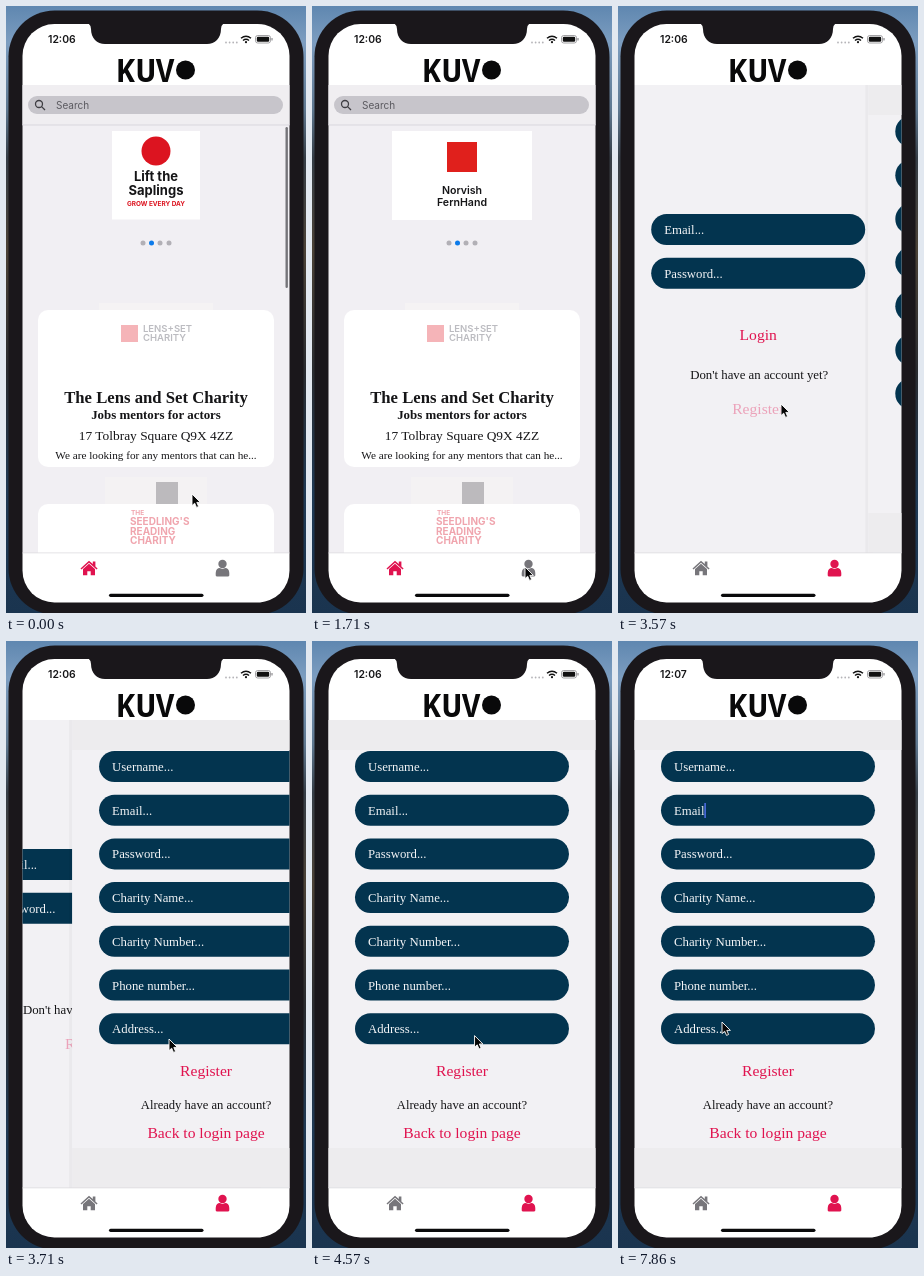
Animation, 300 px wide and 607 px high, one loop 8000 ms. Source, as an HTML page:

```html
<!DOCTYPE html>
<html lang="en">
<head>
<meta charset="utf-8">
<style>
  html, body { margin: 0; width: 100%; height: 100%; overflow: hidden; background: #14283c; }
  svg { display: block; width: 100vw; height: 100vh; }
  .serif { font-family: "Liberation Serif", serif; }
  .sans { font-family: Inter, sans-serif; }
  .mono { font-family: "Noto Sans Mono", monospace; }
</style>
</head>
<body>
<svg id="stage" viewBox="0 0 300 607" xmlns="http://www.w3.org/2000/svg"></svg>
<script>
const LOOP = 8000, PAGE = 267;
const NAVY = '#03344f', PINK = '#e0134f', GREY = '#77767b', PAPER = '#f2f1f4', BODY = '#1a171b';

const rect = (x, y, w, h, fill, r = 0, extra = '') =>
  `<rect x="${x}" y="${y}" width="${w}" height="${h}" rx="${r}" fill="${fill}" ${extra}/>`;
const circle = (x, y, r, fill) => `<circle cx="${x}" cy="${y}" r="${r}" fill="${fill}"/>`;
const text = (s, x, y, size, { cls = 'serif', fill = '#151517', anchor = 'middle', weight = 400, id = '' } = {}) =>
  `<text class="${cls}" ${id && `id="${id}"`} x="${x}" y="${y}" font-size="${size}" fill="${fill}" text-anchor="${anchor}" font-weight="${weight}">${s}</text>`;
const group = (id, body, extra = '') => `<g id="${id}" ${extra}>${body}</g>`;
const field = (label, y, id) => rect(43, y, 214, 31, NAVY, 15.5) +
  text(label, 56, y + 20, 12.75, { fill: '#f4f5f7', anchor: 'start', id });
const link = (label, y, id) => text(label, 150, y, 15.6, { fill: PINK, id });

const background = `
  <defs>
    <linearGradient id="photo" x1="0" y1="0" x2="0" y2="1">
      <stop offset="0" stop-color="#5f87b0"/><stop offset=".06" stop-color="#7c9dc0"/>
      <stop offset=".17" stop-color="#5f7890"/><stop offset=".25" stop-color="#363e47"/>
      <stop offset=".4" stop-color="#4b4237"/><stop offset=".6" stop-color="#2a2c30"/>
      <stop offset=".8" stop-color="#203a55"/><stop offset="1" stop-color="#1a344f"/>
    </linearGradient>
    <clipPath id="screen"><rect x="16.5" y="18" width="267" height="578.500" rx="32"/></clipPath>
    <clipPath id="content"><rect x="16" y="79" width="268" height="468"/></clipPath>
  </defs>
  ${rect(0, 0, 300, 607, 'url(#photo)')}
  ${rect(2.5, 4.5, 295, 604, BODY, 46)}`;

const slideA = rect(106, 125, 88, 88.5, '#fff') + circle(150, 145, 14.5, '#dc1420') +
  text('Lift the', 150, 175, 13, { cls: 'sans', weight: 700 }) +
  text('Saplings', 150, 189, 13, { cls: 'sans', weight: 700 }) +
  text('GROW EVERY DAY', 150, 200, 6.4, { cls: 'sans', weight: 700, fill: '#dc1420' });
const slideB = rect(80, 125, 140, 89, '#fff') + rect(135, 136, 30, 30, '#e0201c') +
  text('Norvish', 150, 188, 10.6, { cls: 'sans', weight: 600 }) +
  text('FernHand', 150, 200, 10.6, { cls: 'sans', weight: 600 });

const faint = { cls: 'sans', fill: '#bcbcc1', anchor: 'start', weight: 600 };
const blush = { cls: 'sans', fill: '#f0a5ae', anchor: 'start', weight: 700 };
const home = rect(16, 79, 268, 468, '#f1eff3') +
  rect(16, 79, 268, 40, '#f0eef1') + rect(16, 118.5, 268, 1, '#dad8dd') +
  rect(22, 90, 255, 18, '#c7c5cb', 9) +
  `<g fill="none" stroke="#3f3e43" stroke-width="1.3"><circle cx="33" cy="98" r="3.5"/><path d="M35.6 100.6L39 104"/></g>` +
  text('Search', 50, 103, 10, { cls: 'sans', fill: '#5b5a60', anchor: 'start' }) +
  group('slides', slideA + `<g transform="translate(${PAGE})">${slideB}</g>`) +
  [137, 145.5, 154, 163].map((x, i) => circle(x, 237, 2.5, i === 1 ? '#0d7bea' : '#b2b0b6')).join('') +
  rect(93, 297, 114, 8, '#f5f3f4') +
  rect(32, 304, 236, 157, '#fff', 10) +
  rect(115, 319, 17, 17, '#f5b4b8') +
  text('LENS+SET', 137, 326, 9.5, faint) + text('CHARITY', 137, 335, 9.5, faint) +
  text('The Lens and Set Charity', 150, 397, 16.7, { weight: 700 }) +
  text('Jobs mentors for actors', 150, 413, 12.9, { weight: 700 }) +
  text('17 Tolbray Square Q9X 4ZZ', 150, 434, 13.4) +
  text('We are looking for any mentors that can he...', 150, 453, 11.2) +
  rect(99, 471, 102, 29, '#f4f2f3') +
  rect(32, 498, 236, 80, '#fff', 10) +
  rect(150, 476, 22, 22, '#bcbabd') +
  text('THE', 125, 509, 6.5, blush) +
  ["SEEDLING'S", 'READING', 'CHARITY'].map((s, i) => text(s, 124, 519 + i * 9.5, 10, blush)).join('') +
  group('scrollbar', rect(279.5, 121, 2.4, 161, '#757479', 1.2));

const login = rect(16, 79, 268, 468, PAPER) +
  field('Email...', 208) + field('Password...', 251.8) +
  rect(56, 216, 1.3, 15, '#4a68f0', 0, 'id="loginCaret"') +
  link('Login', 334) + text("Don't have an account yet?", 151, 373, 12.8) +
  link('Register', 408, 'registerLink');

const labels = ['Username', 'Email', 'Password', 'Charity Name', 'Charity Number', 'Phone number', 'Address'];
const register = rect(13, 79, 3, 468, '#000', 0, 'opacity=".03"') +
  rect(16, 79, 268, 468, PAPER) +
  rect(16, 79, 268, 30, '#edecee') + rect(16, 507, 268, 40, '#edecee') +
  labels.map((s, i) => field(s + '...', 110 + i * 43.7, 'input' + i)).join('') +
  rect(56, 162, 1.3, 15, '#5b78ff', 0, 'id="emailCaret"') +
  link('Register', 435) + text('Already have an account?', 150, 468, 12.6) +
  link('Back to login page', 497);

const chrome = rect(16, 18, 268, 61, '#fff') +
  text('KUV', 111, 76, 32, { cls: 'mono', anchor: 'start', weight: 700, fill: '#09090a' }) +
  circle(179.5, 64, 9.5, '#09090a') +
  text('', 42, 37, 10.4, { cls: 'sans', anchor: 'start', weight: 600, id: 'clock' }) +
  [220, 223.6, 227.2, 230.8].map(x => circle(x, 36.5, .9, '#b5b4b8')).join('') +
  `<g fill="none" stroke="#111" stroke-width="1.5"><path d="M235 32.3q5-4.2 10 0M237 34.5q3-2.4 6 0"/></g>` +
  circle(240, 36.2, 1.1, '#111') +
  rect(249.5, 29.5, 15, 7.5, 'none', 2.2, 'stroke="#8c8b8f" stroke-width=".8"') +
  rect(250.8, 30.8, 12.4, 4.9, '#111', 1.2) + rect(265.4, 32, 1.2, 2.6, '#8c8b8f', .5) +
  rect(16, 547, 268, 50, '#fff') + rect(16, 546.5, 268, .8, '#dddce0') +
  group('homeTab', `<path d="M74.5 562.5L83 554.700l3.800 3.400V555.500h2.600v5l2.200 2-1 1.100-7.600-6.800-7.500 6.800z"/><path d="M77 563.100l6-5.300 6 5.300v6.200h-4.300v-4h-3.400v4H77z"/>`) +
  group('userTab', `<circle cx="216.500" cy="558" r="4.200"/><path d="M209.700 569.400v-2.500c0-3 2-4.800 4-4.800q2.800 1.600 5.600 0c2 0 4 1.800 4 4.800v2.500q-.3 1-1.300 1h-11q-1 0-1.300-1z"/>`) +
  rect(103, 587.7, 94.5, 3.2, '#0a0a0b', 1.6) +
  `<path d="M79 17q6 0 6 6c0 9 6 15 14 15h102c8 0 14-6 14-15q0-6 6-6z" fill="${BODY}"/>`;

const pointer = group('cursor',
  `<path d="M0 0V11.600L2.700 9.200 4.500 13.400 6.600 12.500 4.800 8.400H8.400z" fill="#050505" stroke="#fff" stroke-width=".9"/>`);

document.getElementById('stage').innerHTML = background +
  `<g clip-path="url(#screen)"><g clip-path="url(#content)">
    ${group('home', home)}${group('login', login)}${group('register', register)}
  </g>${chrome}</g>${pointer}`;

const el = id => document.getElementById(id);
const clamp = v => Math.min(1, Math.max(0, v));
const span = (t, from, to) => clamp((t - from) / (to - from));
const easeInOut = u => u < .5 ? 4 * u ** 3 : 1 - (2 - 2 * u) ** 3 / 2;
const smooth = u => u * u * (3 - 2 * u);
const between = (t, from, to) => t >= from && t < to;
const show = (id, on) => el(id).setAttribute('display', on ? 'inline' : 'none');
const shift = (id, x, y = 0) => el(id).setAttribute('transform', `translate(${x} ${y})`);

// [time, x, y] of the pointer tip
const path = [
  [140, 186, 488], [680, 184, 259], [1080, 184, 259], [1700, 213, 561], [2650, 213, 561],
  [3350, 163, 398], [4500, 163, 398], [5500, 131, 163], [6930, 131, 163], [7800, 104, 381]
];
function pointerAt(t) {
  const i = path.findIndex(p => p[0] > t);
  if (i === 0) return path[0].slice(1);
  if (i < 0) return path.at(-1).slice(1);
  const [a, b] = [path[i - 1], path[i]];
  const u = smooth(span(t, a[0], b[0]));
  return [a[1] + (b[1] - a[1]) * u, a[2] + (b[2] - a[2]) * u];
}

// Critically damped spring for the page push
function pushAt(t) {
  const s = Math.max(0, t - 3537) * .0177;
  return 1 - (1 + s) * Math.exp(-s);
}

function render(t) {
  const onProfile = t >= 1720, push = pushAt(t);
  show('home', !onProfile);
  show('login', onProfile && t < 4400);
  show('register', t > 3537);
  el('homeTab').setAttribute('fill', onProfile ? GREY : PINK);
  el('userTab').setAttribute('fill', onProfile ? PINK : GREY);
  el('clock').textContent = t < 5000 ? '12:06' : '12:07';

  shift('slides', -PAGE * easeInOut(span(t, 210, 835)));
  el('scrollbar').setAttribute('opacity', 1 - span(t, 350, 830));

  show('loginCaret', between(t, 1720, 2280) || between(t, 2700, 3280));
  el('registerLink').setAttribute('opacity', 1 - .65 * span(t, 3400, 3550));
  shift('login', -80 * push);
  shift('register', PAGE * (1 - push));

  const typed = t < 6250 ? 0 : Math.min(5, 1 + Math.floor((t - 6250) / 110));
  const input = el('input1');
  input.textContent = typed ? 'Email'.slice(0, typed) : 'Email...';
  show('emailCaret', t >= 6130);
  shift('emailCaret', typed ? input.getComputedTextLength() : 0);

  shift('cursor', ...pointerAt(t));
}

const start = performance.now();
function tick() {
  render((performance.now() - start) % LOOP);
  requestAnimationFrame(tick);
}
tick();
</script>
</body>
</html>
```
